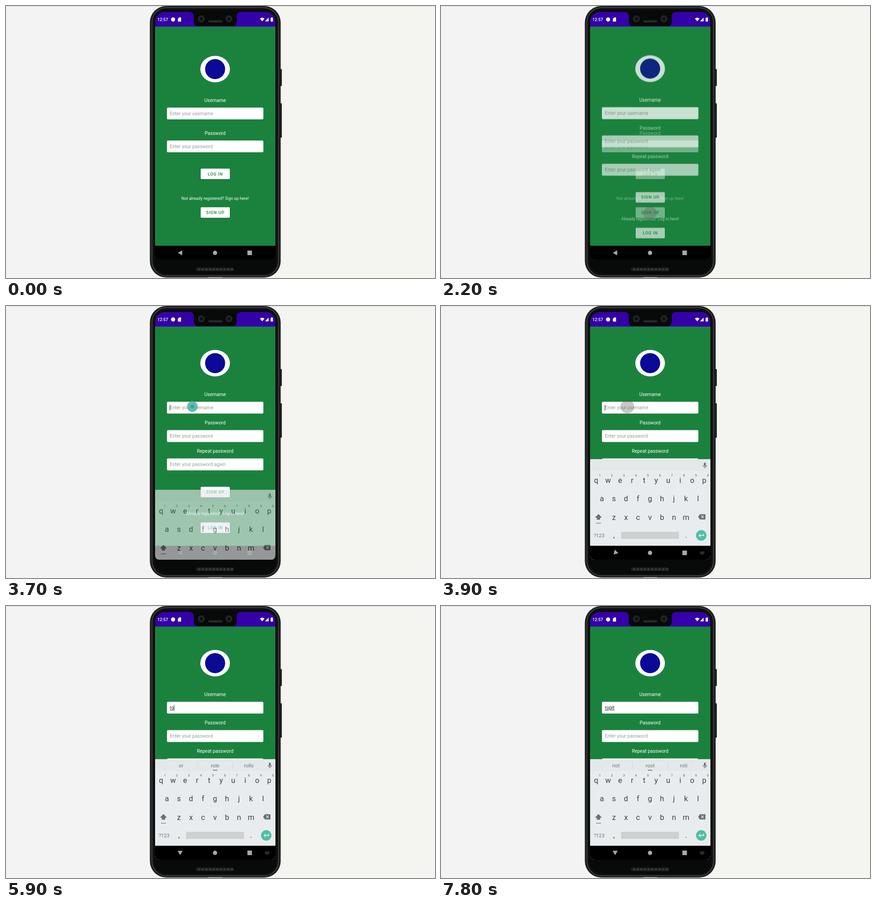
Recreate the animation shown at these times as an HTML page. Size 941 px wide and 595 px high, loop 8 s.

```html
<!DOCTYPE html>
<html lang="en">
<head>
<meta charset="utf-8">
<title>Sign-up on a phone</title>
<style>
  html, body { margin: 0; width: 100%; height: 100%; overflow: hidden; background: #f3f3f4; }
  svg { display: block; }
  text { font: 10.4px Roboto, sans-serif; text-anchor: middle; fill: #fff; }
  .left { text-anchor: start; fill: #9b9b9b; }
  .typed { text-anchor: start; fill: #222; text-decoration: underline; }
  .small { font-size: 9.1px; }
  .button { font-size: 9.1px; font-weight: 500; letter-spacing: .81px; fill: #1b823e; }
  .clock { font-size: 9.3px; font-weight: 500; text-anchor: start; }
  .key { font-size: 16.5px; fill: #384246; }
  .digit { font-size: 7px; fill: #525c60; }
  .word { font-size: 11px; fill: #6c7579; }
</style>
</head>
<body>
<svg width="941" height="595" viewBox="0 0 941 595">
  <defs>
    <clipPath id="glass"><path d="M327 555V38Q327 13 352 13H566Q591 13 591 38V545Q591 555 581 555H337Q327 555 327 545Z"/></clipPath>
    <filter id="shade" x="-10%" y="-20%" width="120%" height="160%">
      <feDropShadow dx="0" dy="1" stdDeviation=".8" flood-opacity=".35"/>
    </filter>
  </defs>
  <rect width="941" height="595" fill="#f3f3f4"/>
  <rect x="459" width="482" height="595" fill="#f4f5f0"/>
  <rect width="941" height="1" fill="#d6d6d6"/>

  <g id="body">
    <path d="M601 138h4v37h-4zM601 213h4v75h-4z" fill="#1d1d1d"/>
    <rect x="315.5" y="0" width="287" height="594" rx="36" fill="#1e1f1f"/>
    <rect x="320.5" y="4" width="277" height="586" rx="32" fill="#080909" stroke="#4d4e4e" stroke-width="1.4"/>
    <rect x="323.5" y="8" width="271" height="579" rx="30" fill="none" stroke="#1d1e1e"/>
    <rect x="444" y="593.5" width="30" height="1.5" fill="#e4e4e4"/>
    <rect x="417" y="572" width="83" height="8" rx="2" fill="#1d1d1d"/>
    <path d="M421 576H498" stroke="#383838" stroke-width="4" stroke-dasharray="5 3"/>
  </g>

  <g clip-path="url(#glass)">
    <rect x="327" y="13" width="264" height="542" fill="#1b823e"/>
    <g id="login"></g>
    <g id="signup"></g>
    <rect x="327" y="524.5" width="264" height="31"/>
    <g id="keyboard"></g>
    <rect id="navCover" x="327" y="524.5" width="264" height="31"/>
    <g fill="#a9a9a9">
      <path id="back" d="M377 540L386.500 534.500V545.500Z"/>
      <circle cx="458.5" cy="540" r="4.7"/>
      <rect x="529.5" y="535" width="10" height="10" rx=".8"/>
      <path id="imeIcon" d="M568 538H578M568 540.500H578M570 543H576" stroke="#929292" stroke-width="1.2" stroke-dasharray="1.400 .6"/>
    </g>
    <rect x="327" y="13" width="264" height="32" fill="#3400a8"/>
    <text class="clock" x="332" y="33">12:57</text>
    <g fill="#fff">
      <circle cx="366.5" cy="29.500" r="4.500"/>
      <path d="M380 25H384V34H377V28Z"/>
      <path d="M557 27.500Q562 23.500 567 27.500L562 33.500Z"/>
      <path d="M576 25.500V33.500H568Z"/>
      <path d="M582 25H584.500V26H585.500V34H580.500V26H582Z"/>
    </g>
    <path d="M402 13Q412 13 412 23V34Q412 44 422 44H496Q506 44 506 34V23Q506 13 516 13Z" fill="#080909"/>
    <g id="touches"></g>
  </g>
  <g fill="#252626">
    <circle cx="428.500" cy="28" r="7.500"/><circle cx="489" cy="28" r="7.500"/>
    <rect x="444" y="31" width="30" height="5" rx="1"/>
    <g fill="#111"><circle cx="428.500" cy="28" r="4"/><circle cx="489" cy="28" r="4"/></g>
  </g>
</svg>
<script>
const $ = id => document.getElementById(id);
const MID = 458.7;
const label = (s, y, cls = '', x = MID, id = '') => `<text id="${id}" class="${cls}" x="${x}" y="${y}">${s}</text>`;
const rect = (x, y, w, h, fill, rx = 0) => `<rect x="${x}" y="${y}" width="${w}" height="${h}" rx="${rx}" fill="${fill}"/>`;
const field = (hint, y, id) => rect(353, y, 211.5, 25.8, '#fff', 2.5) + label(hint, y + 16.6, 'left', 359.3, id);
const button = (s, y) => `<g filter="url(#shade)">${rect(427, y, 64, 23, '#fff', 2)}</g>` + label(s, y + 14.8, 'button', MID + .4);
const badge = y => `<ellipse cx="${MID}" cy="${y}" rx="32.5" ry="29" fill="#fff"/><circle cx="${MID}" cy="${y}" r="22" fill="#0a0a96"/>`;

$('login').innerHTML = badge(138) + label('Username', 210) + field('Enter your username', 222.3) +
  label('Password', 281.6) + field('Enter your password', 294.2) + button('LOG IN', 355.8) +
  label('Not already registered? Sign up here!', 424.2, 'small') + button('SIGN UP', 440.3);

$('signup').innerHTML = badge(125) + label('Username', 197.2) + field('Enter your username', 209.5, 'hint') +
  label('', 226.1, 'typed', 359.3, 'typed') + '<rect id="caret" y="216" width="1" height="13" fill="#444"/>' +
  label('Password', 259.2) + field('Enter your password', 271.6) +
  label('Repeat password', 321.2) + field('Enter your password again', 333.6) + button('SIGN UP', 395.5) +
  label('Already registered? Log in here!', 457.3, 'small') + button('LOG IN', 473.5);

const STEP = 26.35;
const row = (keys, x, y, cls = 'key') => [...keys].map((k, i) => label(k, y, cls, x + i * STEP)).join('');
$('keyboard').innerHTML = rect(327, 335, 264, 222, '#e8ecee') + rect(327, 335, 264, 26, '#e4e8e9') +
  row('qwertyuiop', 340.2, 387) + row('1234567890', 348.4, 372.5, 'digit') +
  row('asdfghjkl', 353, 427) + row('zxcvbnm', 379.4, 467.5) +
  label('?123', 505.5, 'word', 346.8) + label(',', 507, 'key', 379.4) + label('.', 507, 'key', 537.7) +
  rect(395, 494, 127, 15.5, '#cdd1d2', 2) + `
  <g fill="#687175">
    <path d="M345.300 455L353 463H349V467.500H341.700V463H337.700Z"/><path d="M340 474.500H351V475.700H340Z"/>
    <path d="M564 461.300L568 455.500H580V467H568Z"/>
    <rect x="576.700" y="342.500" width="4" height="8" rx="2"/>
    <path d="M574.500 348a4.200 4.200 0 0 0 8.400 0M578.700 352V355" fill="none" stroke="#687175" stroke-width="1.200"/>
  </g>
  <path d="M571 458.500L576 463.700M576 458.500L571 463.700" stroke="#e8ecee" stroke-width="1.300"/>
  <circle cx="570.800" cy="501.800" r="11.500" fill="#4fbfa5"/>
  <path d="M576 498V502H566M569 499L566 502L569 505" fill="none" stroke="#fff" stroke-width="1.400"/>
  <path id="dividers" d="M419.500 341V357M497.500 341V357" stroke="#d0d4d6"/>
  <g id="words">${[384, MID, 532.5].map(x => label('', 353.3, 'word', x)).join('')}
    <path d="M454.500 359.300H463" stroke="#444d50" stroke-width="2" stroke-dasharray="2 1.300"/></g>`;

const NAME = 'ropit';
const TYPED = [5300, 5450, 6000, 6700, 7300];
const WORDS = ['or role rolls', 'or role rolls', 'drop rope ropes', 'drop rope ropes', 'riot root roti'].map(s => s.split(' '));
const keyX = k => 340.2 + 'qwertyuiop'.indexOf(k) * STEP;

// x, y, start, time held, end
const taps = [[458.5, 453.5, 1660, 390, 3150], [408.8, 220, 3300, 500, 5050],
  ...[...NAME].map((k, i) => [keyX(k), 381, TYPED[i] - 80, 90, TYPED[i] + 180])];
$('touches').innerHTML = taps.map(([x, y]) =>
  `<g transform="translate(${x} ${y})"><circle/><circle r="4" fill="#328d83" opacity=".7"/></g>`).join('');

const clamp = v => Math.min(1, Math.max(0, v));
const easeOut = (t, start, length) => 1 - (1 - clamp((t - start) / length)) ** 2;
const set = (el, attrs) => { for (const k in attrs) el.setAttribute(k, attrs[k]); };
const show = (el, on) => set(el, { visibility: on ? 'visible' : 'hidden' });

function drawTouch(group, [, , start, held, end], t) {
  const age = t - start, down = age < held;
  const [dot, core] = group.children;
  show(group, age > 0 && t < end);
  set(dot, down
    ? { r: 1 + Math.max(0, age) * .0265, fill: '#4db6a5', opacity: .88 }
    : { r: 15, fill: '#555', opacity: .35 * clamp((end - t) / (end - start - held)) });
  set(core, { opacity: down && age > 300 ? .6 : 0 });
}

function draw(t) {
  const swap = easeOut(t, 2050, 400);
  set($('login'), { opacity: 1 - swap });
  set($('signup'), { opacity: swap, transform: `translate(0 ${(1 - swap) * 30})` });

  const rise = easeOut(t, 3580, 300);
  set($('keyboard'), { opacity: rise, transform: `translate(0 ${(1 - rise) * 189})` });
  show($('navCover'), rise === 1);
  show($('imeIcon'), t > 3600);
  set($('back'), { transform: `rotate(${-90 * clamp((t - 3800) / 200)} 382 540)` });
  show($('dividers'), t >= 4200);

  const count = TYPED.filter(at => t >= at).length;
  show($('hint'), !count);
  $('typed').textContent = NAME.slice(0, count);
  const since = t - (count ? TYPED[count - 1] : 3500);
  show($('caret'), since >= 0 && Math.floor(since / 500) % 2 === 0);
  set($('caret'), { x: 359 + $('typed').getComputedTextLength() });
  show($('words'), count);
  if (count) WORDS[count - 1].forEach((w, i) => { $('words').children[i].textContent = w; });

  taps.forEach((tap, i) => drawTouch($('touches').children[i], tap, t));
}

const begin = performance.now();
function tick() {
  draw((performance.now() - begin) % 8000);
  requestAnimationFrame(tick);
}
tick();
</script>
</body>
</html>
```
